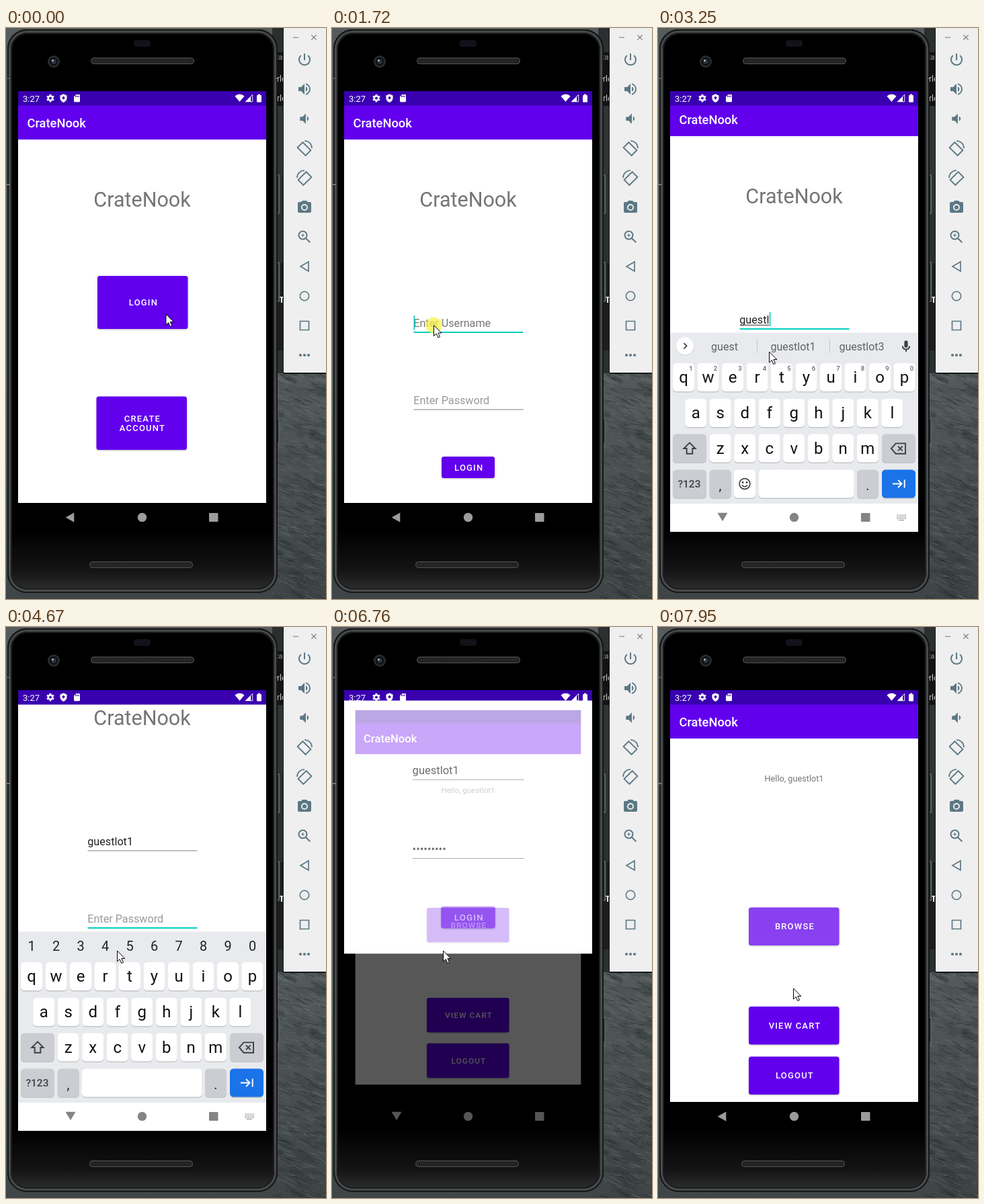
An HTML page with a canvas for the animation above (8 s loop, 476 by 850 pixels).

```html
<!DOCTYPE html>
<html lang="en">
<head>
<meta charset="utf-8">
<title>Phone app demo</title>
<style>
html, body { margin: 0; width: 100%; height: 100%; overflow: hidden; background: #222; }
canvas { display: block; width: 476px; height: 850px; }
</style>
</head>
<body>
<canvas id="stage" width="476" height="850"></canvas>
<script>
const W = 476, H = 850, LOOP = 8000;
const APP = 'CrateNook', USER = 'guestlot1', OTHER = 'guestlot3';
const PURPLE = '#6200ee', DARK = '#3900b0', TEAL = '#03d0bd', SLATE = '#5c7885';
const X0 = 18, Y0 = 94, SW = 369, SH = 656, CX = 202.5, CY = 422;

// Event times in ms
const OPEN_LOGIN = 898, FOCUS_USER = 1690, TYPE_USER = 2450, FOCUS_PASS = 4150,
  TYPE_PASS = 4800, FOCUS_BUTTON = 6150, PRESS = 6500, OPEN_MENU = 6709;

const main = document.getElementById('stage').getContext('2d');
const layer = newCanvas(), backdrop = newCanvas();
let c = main;

function newCanvas() {
  const el = document.createElement('canvas');
  el.width = W; el.height = H;
  return el.getContext('2d');
}
const clamp = v => Math.max(0, Math.min(1, v));
const ramp = (t, a, b) => clamp((t - a) / (b - a));
const smooth = p => p * p * (3 - 2 * p);
const ease = (t, a, b) => smooth(ramp(t, a, b));

function box(x, y, w, h, color, r = 0) {
  c.fillStyle = color;
  c.beginPath();
  c.roundRect(x, y, w, h, r);
  c.fill();
}
function disc(x, y, r, color) {
  c.fillStyle = color;
  c.beginPath();
  c.arc(x, y, r, 0, 7);
  c.fill();
}
function text(s, x, y, size, color, align = 'left', weight = 400, gap = 0) {
  c.font = `${weight} ${size}px Roboto, sans-serif`;
  c.letterSpacing = gap + 'px';
  c.textAlign = align;
  c.fillStyle = color;
  c.fillText(s, x, y);
  c.letterSpacing = '0px';
}
// Icon paths live on a 24-unit grid; a line width makes them outlines
function icon(d, x, y, size, color, line = 0, turn = 0) {
  const p = new Path2D(d);
  c.save();
  c.translate(x, y);
  c.rotate(turn);
  c.scale(size / 24, size / 24);
  c.translate(-12, -12);
  if (line) {
    c.lineWidth = line; c.strokeStyle = color; c.stroke(p);
  } else {
    c.fillStyle = color; c.fill(p, 'evenodd');
  }
  c.restore();
}

// ---- static surroundings ----
function drawStone() {
  let seed = 11;
  const rnd = () => (seed = seed * 16807 % 2147483647) / 2147483647;
  const g = c.createLinearGradient(0, 500, 0, H);
  g.addColorStop(0, '#565c5e'); g.addColorStop(.5, '#4a5052'); g.addColorStop(1, '#3f4547');
  c.fillStyle = g;
  c.fillRect(0, 0, W, H);
  const streak = (len, slope, width, color) => {
    const x = 390 + rnd() * 90, y = 505 + rnd() * 345, dy = (slope + rnd() * .5 - .25) * len;
    c.lineWidth = width;
    c.strokeStyle = color;
    c.beginPath();
    c.moveTo(x, y);
    c.quadraticCurveTo(x + len * .5, y + dy * .5 + (rnd() - .5) * 6, x + len, y + dy);
    c.stroke();
  };
  for (let i = 0; i < 90; i++) streak(14 + rnd() * 26, .35, 4 + rnd() * 8, 'rgba(36,41,43,.12)');
  for (let i = 0; i < 320; i++) streak(5 + rnd() * 14, .3, .6 + rnd(), 'rgba(135,143,145,.2)');
  for (let i = 0; i < 200; i++) streak(6 + rnd() * 18, .4, .7 + rnd(), 'rgba(20,24,26,.28)');
}
function drawDesktop() {
  box(396, 0, 20, 514, '#2b2f30');
  box(396, 36, 20, 80, '#111314');
  box(396, 116, 20, 102, '#303435');
  box(396, 350, 20, 130, '#1b1d1e');
  text('ta', 402, 47, 11, '#999');
  text('rle', 403, 80, 12, '#ccc');
  text('rle', 403, 109, 12, '#ccc');
  text('T', 406, 409, 13, '#fff', 'left', 700);
}
function outline(inset, r, width, color) {
  c.lineWidth = width;
  c.strokeStyle = color;
  c.beginPath();
  c.roundRect(2 + inset, 2 + inset, 402 - 2 * inset, 839 - 2 * inset, r);
  c.stroke();
}
function drawPhone() {
  for (const [y, h] of [[218, 59], [348, 60], [580, 40]]) {
    box(401, y, 6.5, h, '#565b5b', 2);
    box(402, y + 2, 3, h - 4, '#1a1c1c', 1);
  }
  const body = c.createLinearGradient(0, 0, 0, H);
  body.addColorStop(0, '#000'); body.addColorStop(.88, '#000');
  body.addColorStop(.95, '#141414'); body.addColorStop(.985, '#2e2e2e');
  box(2, 2, 402, 839, body, 29);
  outline(1, 28, 2, '#161818');
  outline(3.5, 26, 3, '#484b4b');
  outline(6, 24, 2, '#1c1d1d');
  box(0, 232, 6, 2, '#777'); box(400, 74, 4, 2, '#555'); box(2, 74, 5, 2, '#555');
  box(190, 18, 25, 10, '#12121a', 4);
  disc(71, 50, 9, '#2c2c2e'); disc(71, 50, 6.5, '#121319');
  disc(71, 50, 3.5, '#2d3440'); disc(69.5, 48.5, 1.4, '#b6bfca');
  for (const [x, y] of [[126, 44], [124, 794]]) {
    box(x, y, 154, 10, '#484848', 5);
    box(x + 1.5, y + 1.5, 151, 7, '#1c1c1c', 3.5);
    for (let i = 4; i < 150; i += 3) box(x + i, y + 3, 1.2, 4, '#343434');
  }
}
function drawPanel() {
  box(412, 0, 64, 515, '#17191a');
  box(413, 0, 63, 513, '#efefef');
  box(427, 13.5, 8, 1.2, '#888');
  icon('M4 4L20 20M20 4L4 20', 458, 14, 11, '#777', 2.6);
  icon('M13 3h-2v10h2V3zm4.83 2.17l-1.42 1.42A6.92 6.92 0 0 1 19 12a7 7 0 1 1-11.41-5.42L6.17 5.17A8.93 8.93 0 0 0 3 12a9 9 0 1 0 14.83-6.83z', 444, 47, 24, SLATE);
  icon('M3 9v6h4l5 5V4L7 9H3zm13.5 3A4.5 4.5 0 0 0 14 7.97v8.05A4.47 4.47 0 0 0 16.5 12zM14 3.23v2.06a7 7 0 0 1 0 13.42v2.06a9 9 0 0 0 0-17.54z', 444, 91, 24, SLATE);
  icon('M5 9v6h4l5 5V4L9 9zM18.5 12A4.5 4.5 0 0 0 16 7.97v8.05A4.47 4.47 0 0 0 18.5 12z', 444, 135, 23, SLATE);
  for (const [y, side] of [[179, 1], [223, -1]]) {
    c.save();
    c.translate(444, y);
    c.scale(side, 1);
    icon('M6.5 3.5h11v17h-11z', -0.5, 1, 24, SLATE, 1.9, -Math.PI / 4);
    icon('M12 1A11 11 0 0 1 23 12', 0, 0, 24, SLATE, 1.7);
    c.restore();
  }
  icon('M9 2L7.17 4H4a2 2 0 0 0-2 2v12a2 2 0 0 0 2 2h16a2 2 0 0 0 2-2V6a2 2 0 0 0-2-2h-3.17L15 2H9zm3 15a5 5 0 1 1 0-10 5 5 0 0 1 0 10z', 444, 267, 24, SLATE);
  disc(444, 267, 3.1, SLATE);
  icon('M15.5 9.5a6 6 0 1 1-12 0a6 6 0 0 1 12 0zM14 14l6.3 6.3', 444, 311, 24, SLATE, 2);
  icon('M9.5 7v5M7 9.5h5', 444, 311, 24, SLATE, 1.2);
  icon('M18 5v14L6 12z', 444, 355, 24, SLATE, 1.7);
  icon('M19 12a7 7 0 1 1-14 0a7 7 0 0 1 14 0z', 444, 399, 23, SLATE, 1.7);
  icon('M5.5 5.5h13v13h-13z', 444, 443, 24, SLATE, 1.7);
  for (const dx of [-6, 0, 6]) disc(444 + dx, 487, 2.1, SLATE);
}

// ---- app screens ----
function page(pan, drawBody) {
  box(X0, Y0, SW, 613 - pan, '#fff');
  c.save();
  c.translate(0, -pan);
  box(X0, 115, SW, 51, PURPLE);
  text(APP, 31.5, 147.5, 18.3, '#fff', 'left', 500);
  drawBody();
  c.restore();
  box(X0, Y0, SW, 21.5, DARK);
}
function button(x, y, w, h, lines, color = PURPLE) {
  c.save();
  c.shadowColor = 'rgba(0,0,0,.26)'; c.shadowBlur = 2.5; c.shadowOffsetY = 1;
  box(x, y, w, h, color, 3.5);
  c.restore();
  const mid = y + h / 2 + 4.7 - (lines.length - 1) * 7.4;
  lines.forEach((s, i) => text(s, x + w / 2 + 1.2, mid + i * 14.8, 13, '#fff', 'center', 500, 1.18));
}
const bigTitle = () => text(APP, CX, 265.5, 30.5, '#757575', 'center');

function homeScreen() {
  page(0, () => {
    bigTitle();
    button(136, 369, 134.5, 79, ['LOGIN']);
    button(134.5, 548.5, 134.5, 79.5, ['CREATE', 'ACCOUNT']);
  });
}
function field(y, value, hint, hintColor, focused, caretOn, composing) {
  text(value || hint, 121.2, y - 8.5, 16.2, value ? '#222' : hintColor);
  const w = value ? c.measureText(value).width : 0;
  if (composing && value) box(122, y - 6.2, w - 1, 1, '#333');
  if (focused) box(121.5, y - 1, 163, 2, TEAL);
  else box(121.5, y - .5, 163, 1, '#808080');
  if (focused && caretOn) box(121.5 + w, y - 25, 1.7, 21, TEAL);
}
const typed = (t, start, step) => Math.max(0, Math.min(9, Math.floor((t - start) / step) + 1));

function loginScreen(t) {
  const n = typed(t, TYPE_USER, 140), k = typed(t, TYPE_PASS, 130);
  const onUser = t >= FOCUS_USER && t < FOCUS_PASS, onPass = t >= FOCUS_PASS && t < FOCUS_BUTTON;
  const typing = (t > TYPE_USER && n < 9) || (t > TYPE_PASS && k < 9);
  const blink = typing || (t - (onPass ? FOCUS_PASS : FOCUS_USER)) % 1000 < 500;
  const pan = 5 * ease(t, 2000, 2250) + 115 * ease(t, FOCUS_PASS, 4400) +
    102 * ease(t, FOCUS_BUTTON, 6400);
  const color = t >= PRESS ? '#9d5ff0' : t >= FOCUS_BUTTON ? '#8840f0' : PURPLE;
  page(pan, () => {
    bigTitle();
    field(453, USER.slice(0, n), 'Enter Username', '#777', onUser, blink, onUser);
    field(568, '•'.repeat(k), 'Enter Password', '#999', onPass, blink, false);
    button(163, 638, 79, 32, ['LOGIN'], color);
  });
}
function menuScreen() {
  page(0, () => {
    text('Hello, ' + USER, CX, 230, 12.7, '#757575', 'center');
    button(135, 417.5, 134.5, 56.5, ['BROWSE'], '#8840f0');
    button(135, 565, 134.5, 56.5, ['VIEW CART']);
    button(135, 639.5, 134.5, 56.5, ['LOGOUT']);
  });
}

function clipScreen() {
  c.beginPath(); c.rect(X0, Y0, SW, SH); c.clip();
}
function scaled(s, draw) {
  c.save();
  clipScreen();
  c.translate(CX, CY); c.scale(s, s); c.translate(-CX, -CY);
  draw();
  c.restore();
}
// The old window grows slightly while the new one fades in and grows to full size
function openWindow(dt, oldDraw, newDraw) {
  if (dt < 400) scaled(1 + .15 * clamp(dt / 400), oldDraw);
  const alpha = ramp(dt, 35, 85);
  if (!alpha) return;
  c = layer;
  c.clearRect(0, 0, W, H);
  scaled(1 - .15 * (1 - clamp(dt / 335)) ** 3, newDraw);
  c = main;
  c.globalAlpha = alpha;
  c.drawImage(layer.canvas, 0, 0);
  c.globalAlpha = 1;
}

// ---- system parts ----
function key(x, y, w, color = '#fff') {
  box(x, y + 1, w, 42.5, '#c3c6ca', 5.5);
  box(x, y, w, 42, color, 5.5);
}
function letters(row, x, y, marks) {
  [...row].forEach((ch, i) => {
    const kx = x + i * 36.5;
    key(kx, y, 32);
    text(ch, kx + 16, y + 29, 24, '#111', 'center');
    if (marks) text((i + 1) % 10, kx + 27, y + 10.5, 9.5, '#5f6368', 'center', 500);
  });
}
function keyboard(t) {
  const grey = '#cbcdd3', ink = '#3c4043', secret = t >= FOCUS_PASS + 100;
  box(X0, 453.5, SW, 255, '#e8eaed');
  box(X0, 708, SW, 42, '#fff');
  if (secret) {
    for (let i = 0; i < 10; i++) text((i + 1) % 10, 38 + i * 36.5, 481.5, 20, '#222', 'center');
  } else {
    disc(40, 474, 13.5, '#d6d8dc'); disc(40, 473.3, 13, '#fff');
    icon('M9 6l6 6-6 6', 40.5, 473.3, 17, ink, 2.4);
    const n = typed(t, TYPE_USER, 140);
    if (n > 1) {
      text(USER.slice(0, n - 1), 99, 480, 16, '#5f6368', 'center');
      text(USER, 201, 480, 16, '#5f6368', 'center');
      text(OTHER, 303, 480, 16, '#5f6368', 'center');
      box(147, 463, 1, 21, '#c4c7cb'); box(255, 463, 1, 21, '#c4c7cb');
    }
    icon('M12 14a3 3 0 0 0 3-3V5a3 3 0 0 0-6 0v6a3 3 0 0 0 3 3zM17 11a5 5 0 0 1-10 0H5a7 7 0 0 0 6 6.9V21h2v-3.1A7 7 0 0 0 19 11z', 369, 474, 21, ink);
  }
  letters('qwertyuiop', 22, 499, !secret);
  letters('asdfghjkl', 40.3, 552);
  letters('zxcvbnm', 76.7, 604.5);
  key(22, 604.5, 50, grey); key(333, 604.5, 50, grey);
  icon('M12 3l-9 9h4.5v8h9v-8H21z', 47, 626, 23, ink, 2);
  icon('M8 4h15v16H8L1 12zM11.5 8.5l7 7M18.5 8.5l-7 7', 357.5, 626, 23, ink, 2);
  key(22, 657.5, 50, grey); key(76.7, 657.5, 32, grey);
  key(secret ? 113 : 150, 657.5, secret ? 178.5 : 141.5);
  key(296, 657.5, 32, grey); key(333, 657.5, 50, '#1a73e8');
  text('?123', 46.5, 684, 15.5, ink, 'center', 500);
  text(',', 92.5, 688, 20, '#222', 'center');
  text('.', 312, 688, 20, '#222', 'center');
  if (!secret) {
    key(113, 657.5, 32);
    icon('M21 12a9 9 0 1 1-18 0a9 9 0 0 1 18 0zM7.5 14a5 5 0 0 0 9 0', 129, 678.5, 21, ink, 1.9);
    disc(126, 676.5, 1.4, ink); disc(132, 676.5, 1.4, ink);
  }
  icon('M2 12h15M11 6l6 6-6 6M21.5 5.5v13', 358, 678.5, 22, '#fff', 2.1);
  for (let y = 0; y < 3; y++)
    for (let x = 0; x < 6; x++) box(355.5 + x * 2.4, 724.5 + y * 2.5, 1.5, 1.5, '#999');
  box(358, 732, 8, 1.2, '#999');
}
function navIcons(t) {
  const down = t > 2050 && t < 6900;
  const v = t > 2150 && t < 6640 ? 132 : t >= 6640 ? Math.round(85 + 71 * ramp(t, 6800, 7000)) : 156;
  const col = `rgb(${v},${v},${v})`;
  if (down) icon('M3 5h18L12 20z', 96, 727.5, 20, col);
  else icon('M20 3v18L4 12z', 95, 728.5, 19, col);
  disc(202.5, 728.5, 6.7, col);
  box(302, 722, 13.5, 13, col, 1);
}
function statusIcons() {
  text('3:27', 25, 109.5, 13, '#fff');
  c.save();
  c.translate(66, 104.5);
  for (let i = 0; i < 6; i++) { c.rotate(Math.PI / 3); box(-1.4, -5.8, 2.8, 4, '#fff'); }
  disc(0, 0, 4.4, '#fff'); disc(0, 0, 1.9, DARK);
  c.restore();
  icon('M12 1L3 5v6c0 5.5 3.8 10.7 9 12 5.2-1.3 9-6.5 9-12V5z', 85.5, 104.5, 13.5, '#fff');
  icon('M12 7l5 5-5 5-5-5z', 85.5, 104, 11.5, DARK);
  icon('M18 2h-8L4 8v12a2 2 0 0 0 2 2h12a2 2 0 0 0 2-2V4a2 2 0 0 0-2-2z', 105.5, 104.5, 13.5, '#fff');
  for (const x of [103, 105.2, 107.4]) box(x, 100.5, 1.1, 2.5, DARK);
  icon('M0 7.5A17 17 0 0 1 24 7.5L12 22z', 347.5, 104, 14, '#fff');
  icon('M22 2v20H2z', 361.5, 104.5, 12.5, '#fff', 1.8);
  icon('M17 7v15H2z', 361.5, 104.5, 12.5, '#fff');
  box(373, 100, 7, 10.5, '#fff', 1); box(375, 98.5, 3, 2, '#fff');
}

// Pointer stops: start, end, target x, target y
const MOVES = [[150, 700, 163.5, 426], [1150, 1580, 151.5, 442.5], [1800, 2150, 165.5, 482], [7420, 7930, 201.5, 538]];
function pointer(t) {
  let x = 238, y = 426;
  for (const [a, b, tx, ty] of MOVES) {
    const p = ease(t, a, b);
    x += (tx - x) * p; y += (ty - y) * p;
  }
  const glow = t < 1000 ? ramp(t, 790, 820) * (1 - ramp(t, 870, 915))
    : ramp(t, 1640, 1670) * (1 - ramp(t, 1780, 1880));
  if (glow) disc(x, y, 12, `rgba(250,242,65,${.72 * glow})`);
  c.save();
  c.translate(x, y);
  const arrow = new Path2D('M0 0V16L3.7 12.5L6.3 18.5L9 17.3L6.4 11.5H11.3z');
  c.fillStyle = '#fff'; c.fill(arrow);
  c.lineWidth = 1; c.strokeStyle = '#000'; c.stroke(arrow);
  c.restore();
}

function draw(t) {
  c = main;
  c.drawImage(backdrop.canvas, 0, 0);
  box(X0, Y0, SW, SH, '#000');
  c.save();
  clipScreen();
  if (t < OPEN_LOGIN) homeScreen();
  else if (t < OPEN_MENU) openWindow(t - OPEN_LOGIN, homeScreen, () => loginScreen(t));
  else openWindow(t - OPEN_MENU, () => loginScreen(t), menuScreen);
  box(X0, 709, SW, 41, '#000');
  const up = ease(t, 2000, 2250) * (1 - ease(t, 6560, 6690));
  if (up) {
    c.save();
    c.translate(0, (1 - up) * 297);
    keyboard(t);
    c.restore();
  }
  navIcons(t);
  statusIcons();
  c.restore();
  pointer(t);
}

c = backdrop;
drawStone();
drawDesktop();
drawPhone();
drawPanel();

const begin = performance.now();
function tick() {
  draw((performance.now() - begin) % LOOP);
  requestAnimationFrame(tick);
}
tick();
</script>
</body>
</html>
```
